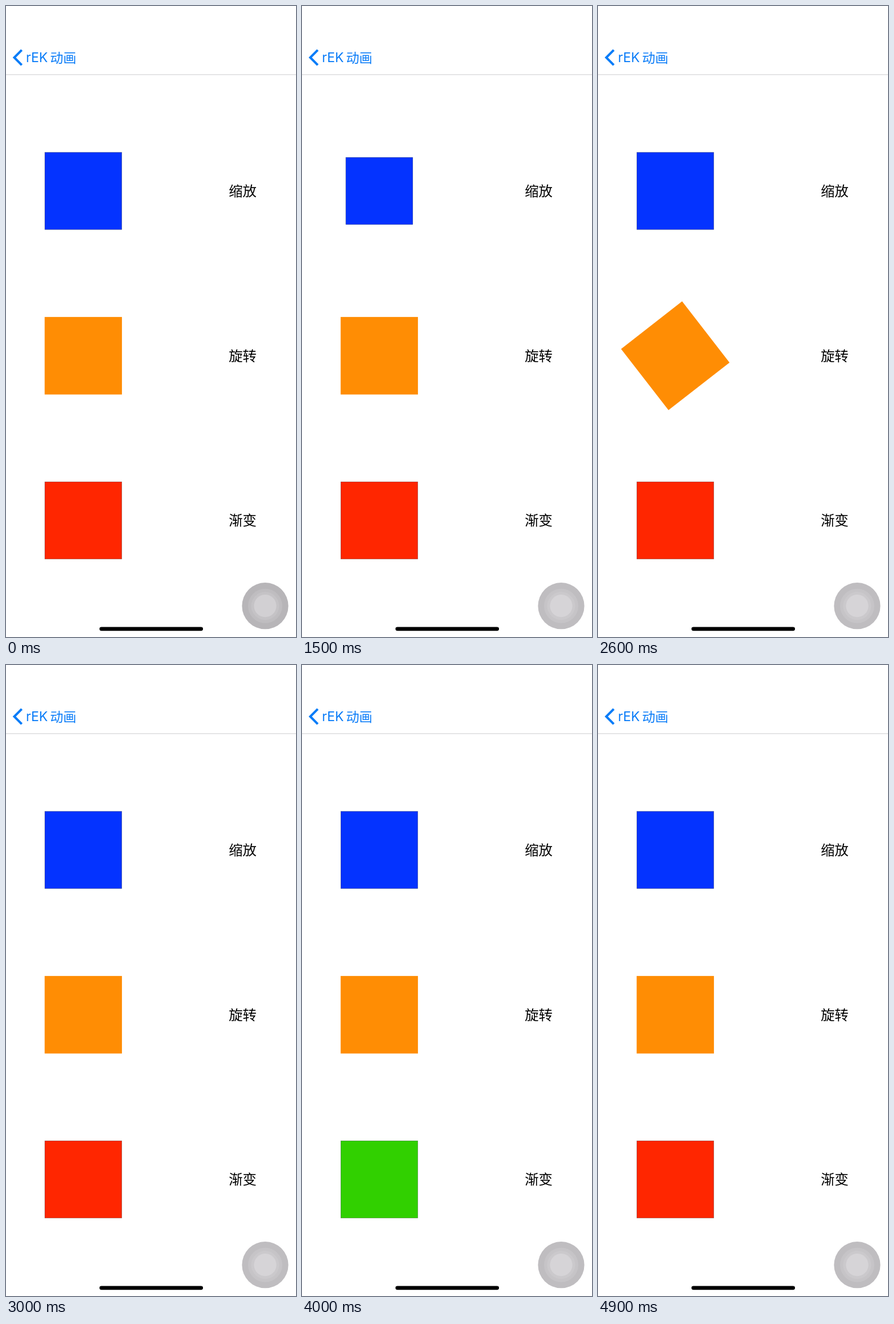
Recreate the animation shown at these times as an HTML page. Size 508 by 1102 pixels, loop 5000 ms.

```html
<!DOCTYPE html>
<html lang="zh-CN">
<head>
<meta charset="utf-8">
<title>动画</title>
<style>
  html, body { margin: 0; width: 100%; height: 100%; overflow: hidden; background: #fff; }
  svg { display: block; width: 100%; height: 100%; }
  text { font-family: Inter, "Noto Sans CJK SC", "Noto Sans CJK", sans-serif; }
  .nav { font-size: 23px; fill: #0a7cf8; }
  .label { font-size: 24.4px; fill: #000; }
  .edge { stroke: #000; stroke-opacity: .35; stroke-width: .8; }
</style>
</head>
<body>
<svg viewBox="0 0 508 1102">
  <path d="M27.6 76.8 14.5 90l13.1 13.2" fill="none" stroke="#0a7cf8" stroke-width="4"/>
  <text class="nav" x="35" y="98">rEK</text>
  <text class="nav" x="77.3" y="98.5">动画</text>
  <rect y="119.3" width="508" height="1.1" fill="#d0d0d3"/>

  <g id="scaleBox" fill="#0433ff"><rect class="edge" x="-67.4" y="-67.4" width="134.8" height="134.8"/></g>
  <g id="spinBox" fill="#ff8d04"><rect x="-67.7" y="-67.7" width="135.4" height="135.4"/></g>
  <g id="colorBox"><rect class="edge" x="-67.4" y="-67.4" width="134.8" height="134.8"/></g>

  <text class="label" x="390.2" y="331.8">缩放</text>
  <text class="label" x="390.2" y="619.5">旋转</text>
  <text class="label" x="390.2" y="907.3">渐变</text>

  <g id="touch">
    <circle cx="454" cy="1047.7" r="40.6"/>
    <circle cx="454" cy="1047.7" r="30"/>
    <circle cx="454" cy="1047.7" r="24.5"/>
    <circle cx="454" cy="1047.7" r="19.6"/>
  </g>
  <rect x="163.7" y="1084.4" width="181.4" height="6.8" rx="3.4"/>
</svg>
<script>
const LOOP = 5000, STEP = 100, HALF = 640;
const CENTER_X = 135.4;
const RED = [255, 38, 0], GREEN = [0, 249, 0];
const IDLE = ['#bfbdc0', '#c6c4c7', '#cbc9cc', '#d6d4d7'];
const PRESSED = ['#b7b5b8', '#bfbdc0', '#c5c3c6', '#d2d0d3'];

const $ = id => document.getElementById(id);
const clamp = x => Math.min(1, Math.max(0, x));
const mix = (a, b, k) => a + (b - a) * k;

// Ease-in-out: cubic-bezier(.42, 0, .58, 1), solved by bisection.
function ease(x) {
  if (x <= 0 || x >= 1) return clamp(x);
  let lo = 0, hi = 1;
  for (let i = 0; i < 24; i++) {
    const u = (lo + hi) / 2, v = 1 - u;
    if (1.26 * v * v * u + 1.74 * v * u * u + u * u * u < x) lo = u; else hi = u;
  }
  return lo * lo * (3 - 2 * lo);
}

const once = (t, start, length) => ease(clamp((t - start) / length));

// Forward, then back at the same pace.
const thereAndBack = (t, start) => ease(clamp(1 - Math.abs((t - start) / HALF - 1)));

function place(id, y, extra = '') {
  $(id).setAttribute('transform', `translate(${CENTER_X} ${y}) ${extra}`);
}

function render(t) {
  place('scaleBox', 323, `scale(${mix(1, 0.8, thereAndBack(t, 597))})`);
  place('spinBox', 610.8, `rotate(${180 * once(t, 2365, 630)})`);

  const k = thereAndBack(t, 3555);
  const rgb = RED.map((c, i) => Math.round(mix(c, GREEN[i], k)));
  place('colorBox', 898.4);
  $('colorBox').setAttribute('fill', `rgb(${rgb})`);

  const shades = t < 100 ? PRESSED : IDLE;
  [...$('touch').children].forEach((ring, i) => ring.setAttribute('fill', shades[i]));
}

// The picture advances ten times a second.
function tick() {
  const t = (performance.now() + 5) % LOOP;
  render(Math.floor(t / STEP) * STEP);
  requestAnimationFrame(tick);
}
tick();
</script>
</body>
</html>
```
